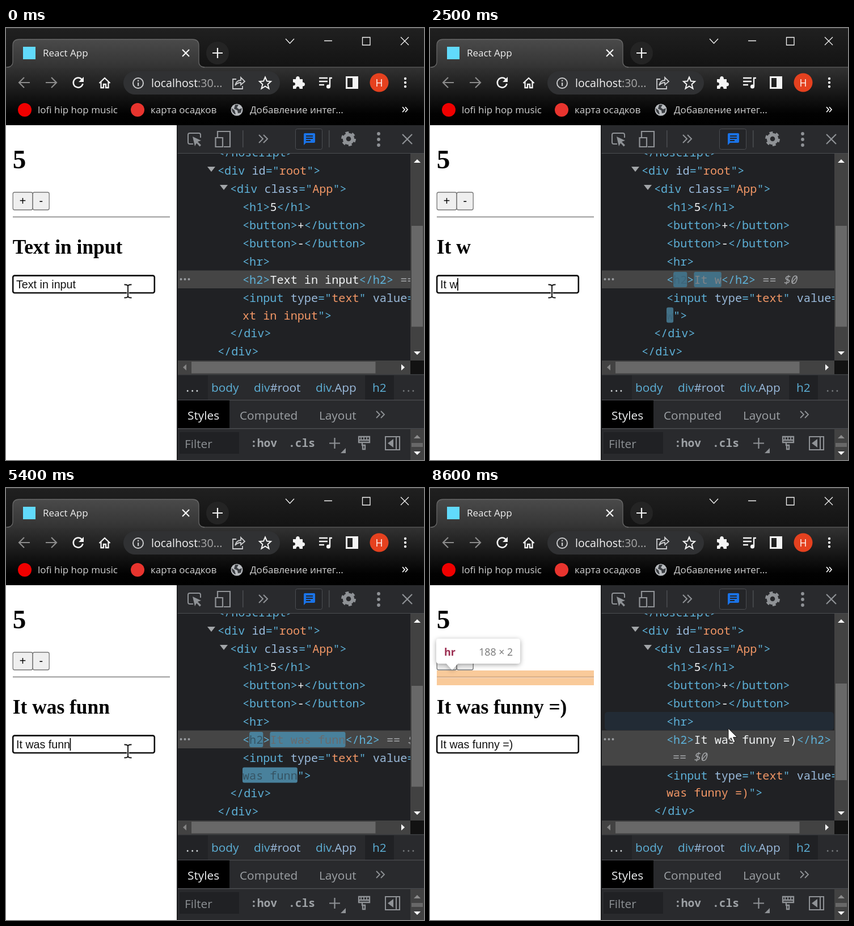
An HTML page for the animation above (8.7 s loop, 737 by 760 pixels).

```html
<!DOCTYPE html>
<html lang="en">
<head>
<meta charset="utf-8">
<title>React App</title>
<style>
html, body { margin: 0; width: 100%; height: 100%; overflow: hidden; background: #fff; }
svg { display: block; width: 737px; height: 760px; }
text { white-space: pre; }
.ui { font-family: "Open Sans", "Noto Sans", sans-serif; }
.code { font: 20.17px "Noto Sans Mono", monospace; fill: #5db0d7; }
.serif { font-family: "Liberation Serif", serif; font-weight: bold; }
.arial { font: 19.67px "Liberation Sans", sans-serif; }
.line { fill: none; stroke-width: 2; }
.attr { fill: #9bbbdc; }
.val { fill: #f29766; }
.txt { fill: #f1f3f4; }
.dim { fill: #a3a5a8; }
</style>
</head>
<body>
<svg viewBox="0 0 737 760">
  <defs>
    <linearGradient id="strip" x2="0" y2="1"><stop stop-color="#202020"/><stop offset="1" stop-color="#131313"/></linearGradient>
    <linearGradient id="tab" x2="0" y2="1"><stop stop-color="#4a4a4a"/><stop offset="1" stop-color="#333"/></linearGradient>
    <linearGradient id="bar" x2="0" y2="1"><stop stop-color="#323232"/><stop offset=".8" stop-color="#020202"/><stop offset="1" stop-color="#000"/></linearGradient>
    <filter id="shadow" x="-20%" y="-30%" width="140%" height="170%"><feDropShadow dx="0" dy="2" stdDeviation="4" flood-opacity=".35"/></filter>
    <clipPath id="tree"><rect x="303" y="221" width="410" height="363"/></clipPath>
  </defs>
  <g id="page"></g>
  <g id="chrome"></g>
  <g id="tools"></g>
  <g id="dom" clip-path="url(#tree)"></g>
  <g id="scroll"></g>
  <g id="pointer"></g>
</svg>
<script>
const LOOP = 8700, CH = 12.1;
const $ = id => document.getElementById(id);
const esc = s => s.replace(/&/g, '&amp;').replace(/</g, '&lt;');
const rect = (x, y, w, h, fill, more = '') =>
  `<rect x="${x}" y="${y}" width="${w}" height="${h}" fill="${fill}" ${more}/>`;
const circle = (x, y, r, fill, more = '') => `<circle cx="${x}" cy="${y}" r="${r}" fill="${fill}" ${more}/>`;
const line = (d, color, w = 2, more = '') =>
  `<path class="line" d="${d}" stroke="${color}" style="stroke-width:${w}" ${more}/>`;
const shape = (d, fill, more = '') => `<path d="${d}" fill="${fill}" ${more}/>`;
const text = (x, y, s, cls, fill, size, more = '') =>
  `<text x="${x}" y="${y}" class="${cls}" fill="${fill}" font-size="${size}" ${more}>${esc(s)}</text>`;
const ui = (x, y, s, fill, size = 20.8, more = '') => text(x, y, s, 'ui', fill, size, more);
const dots = (x, ys, r, fill) => ys.map(y => circle(x, y, r, fill)).join('');

// Code line: parts are [class or colour, string, extra attributes].
const code = (x, y, parts) => `<text class="code" x="${x}" y="${y}">` + parts.map(([c, s, more = '']) =>
  `<tspan ${c[0] === 'r' ? `style="fill:${c}"` : `class="${c}"`} ${more}>${esc(s)}</tspan>`).join('') + '</text>';

function drawChrome() {
  const white = '#f4f4f4', grey = '#c9cacc';
  $('chrome').innerHTML =
    rect(0, 0, 737, 70, 'url(#strip)') + rect(0, 0, 737, 1, '#3a3a3a') +
    rect(0, 69, 737, 102, 'url(#bar)') + line('M0 69H737', '#555', 1.5) +
    shape('M4 70Q12 69 12 60V31Q12 20 23 20H329Q340 20 340 31V60Q340 69 348 70Z', 'url(#tab)') +
    line('M2 69Q12 68 12 60V31Q12 20 23 20H329Q340 20 340 31V60Q340 68 350 69', '#686868', 1.3) +
    rect(30, 33, 22, 22, '#61dafb') +
    ui(65, 50, 'React App', '#f0f0f0', 17) +
    line('M311 38L323 50M323 38L311 50', white, 2.2) +
    circle(373, 44, 20, '#242424') + line('M364 44H382M373 35V53', white, 2.2) +
    line('M493 19L500.500 27L508 19M561 22.500H575M628.500 16.500H642V30H628.500ZM696 16L710 30M710 16L696 30', white, 1.3) +
    line('M42 96H24M32 87L23 96L32 105', '#8b8b8b', 2.2) +
    line('M70 96H88M80 87L89 96L80 105', '#8b8b8b', 2.2) +
    line('M134 91A8.500 8.500 0 1 0 135.500 98', white, 2.5) + shape('M137 86V95H128Z', white) +
    line('M164.500 97L174 88L183.500 97M167.500 95V105H172V99H176V105H180.500V95', white, 2.3) +
    rect(207, 76, 276, 41, '#303133', 'rx="20.5"') +
    circle(233, 97, 9, 'none', `stroke="${grey}" stroke-width="2"`) +
    rect(232, 96, 2.2, 6, grey) + rect(232, 91.5, 2.2, 2.4, grey) +
    `<text class="ui" x="256" y="104" font-size="19.6" fill="${white}">localhost<tspan fill="#a8a8a8">:30...</tspan></text>` +
    line('M406 90H400V107H417V102M404 101Q406 92 414 92V87L421 94L414 100V96Q408 96 404 101Z', grey, 1.8) +
    line('M457 86.500L460 93.500L467 94L461.500 99L463.500 106.500L457 102.500L450.500 106.500L452.500 99L447 94L454 93.500Z', white, 2) +
    shape('M506 90H511Q511 85 514.500 85T518 90H523V95.500Q527 95.500 527 99T523 102.500V107H517.500Q517.500 103 514.500 103T511.500 107H506V101.500Q510 101.500 510 98.500T506 95.500Z', white) +
    line('M552 88H567M552 94H567M552 100H561M571 103V88H575', white, 2.4) + circle(568.5, 103, 3.6, white) +
    rect(600.5, 86.5, 19, 19, 'none', `stroke="${white}" stroke-width="3"`) + rect(611, 87, 8, 18, white) +
    circle(658, 96, 16.5, '#e5411f') + ui(658, 102.5, 'H', '#fff', 17.5, 'text-anchor="middle"') +
    dots(704, [89, 96, 103], 2.2, white) +
    circle(33, 144, 12, '#f00000') + ui(56, 150, 'lofi hip hop music', '#d2d2d2', 17) +
    circle(232, 144, 12, '#e8342e') + ui(255, 150, 'карта осадков', '#d2d2d2', 17) +
    circle(407, 144, 10.5, '#b9bcc0') +
    shape('M398 141L403 145L405 152Q398 150 398 141ZM404 135L410 135L407 140L411 143L416 141L414 149L409 150L408 145L402 142Z', '#3b3e42') +
    ui(430, 150, 'Добавление интег...', '#d2d2d2', 17) +
    line('M699 139L703 143.500L699 148M704 139L708 143.500L704 148', white, 1.8);
}

function drawTools() {
  const grey = '#8f9296', tab = '#9da1a5';
  const arrow = (x, y, dx, dy, fill) => shape(dx
    ? `M${x - 3 * dx} ${y - 5.5}V${y + 5.5}L${x + 3 * dx} ${y}Z`
    : `M${x - 6} ${y - 3 * dy}H${x + 6}L${x} ${y + 3 * dy}Z`, fill);
  $('tools').innerHTML =
    rect(301, 171, 436, 589, '#292a2d') + rect(301, 171, 1.5, 589, '#17181a') +
    rect(302.5, 220, 435, 1, '#4b4d51') + rect(303, 221, 434, 364, '#202124') +
    line('M330 204H324Q321 204 321 201V188Q321 185 324 185H340Q343 185 343 188V193', grey, 2) +
    shape('M329 191L344 198L338 200L344 206L341.500 208.500L336 202.500L333 208Z', grey) +
    line('M373 193V182H395V209H384M369.500 193H382V209H369.500Z', grey, 2.2) +
    rect(417, 180, 1.5, 30, '#4b4d51') + rect(569, 180, 1.5, 30, '#4b4d51') +
    line('M446 188L453 195L446 202M454 188L461 195L454 202', grey, 2) +
    rect(510.5, 177.5, 47, 36, '#242528', 'rx="3" stroke="#4b4d51"') +
    shape('M527 185H543Q545 185 545 187V200Q545 202 543 202H529L525 206V187Q525 185 527 185Z', '#1a73e8') +
    line('M529 190H541M529 194H541M529 198H537', '#242528', 1.8) +
    circle(604, 195, 7.3, 'none', `stroke="${grey}" stroke-width="6"`) +
    circle(604, 195, 11, 'none', `stroke="${grey}" stroke-width="4" stroke-dasharray="5.76 5.76"`) +
    dots(657, [186, 196, 206], 2.9, grey) +
    line('M699 187L716 204M716 187L699 204', grey, 2.2) +
    rect(713, 221, 24, 364, '#424242') + arrow(725, 234, 0, -1, '#fff') + arrow(725, 572, 0, 1, '#fff') +
    rect(303, 585, 410, 24, '#424242') + rect(327, 587, 324.5, 20.5, '#686868') +
    arrow(315, 597, -1, 0, '#858585') + arrow(700, 597, 1, 0, '#fff') + rect(713, 585, 24, 24, '#121212') +
    rect(303, 609, 434, 1.5, '#3c3e41') + rect(303, 611, 53, 43, '#222326') + rect(633, 611, 51, 43, '#202124') +
    ui(317, 640, '...', '#c6cacd', 24, 'letter-spacing="2"') + ui(362, 640, 'body', '#5db0d7') +
    `<text class="ui" font-size="20.8" y="640" fill="#5db0d7"><tspan x="437">div</tspan><tspan class="attr">#root</tspan><tspan x="546">div</tspan><tspan class="attr">.App</tspan></text>` +
    ui(646, 640, 'h2', '#5db0d7') + ui(698, 640, '...', '#707376', 24, 'letter-spacing="2"') +
    rect(303, 654, 434, 1.2, '#4b4d51') + rect(303, 655, 91, 49, '#000') + rect(303, 704, 434, 1.5, '#4b4d51') +
    ui(320, 689, 'Styles', '#f1f3f4') + ui(412, 689, 'Computed', tab) + ui(552, 689, 'Layout', tab) +
    line('M653 674L659 680L653 686M661 674L667 680L661 686', grey, 1.8) +
    rect(306, 711, 105, 38, '#202124') + ui(315, 739, 'Filter', '#8c9094') +
    [[431, ':hov'], [498, '.cls']].map(([x, s]) =>
      text(x, 737, s, '', tab, 19.6, 'font-family="Noto Sans Mono, monospace" font-weight="600"')).join('') +
    line('M570 730.500H589M579.500 721V740', grey, 2.2) + shape('M599 739V748H590Z', grey) +
    line('M622 719H641V729H622ZM622 725H641M628 730V734H633V741H629V734', grey, 2.3) + line('M626 719V724M631 719V724M636 719V724', grey, 1.8) +
    rect(669, 719, 25, 23, 'none', `stroke="${grey}" stroke-width="2"`) + rect(687, 720, 2, 21, grey) + shape('M683 723V738L673 730.500Z', grey) +
    rect(713, 706, 24, 54, '#424242') + rect(715, 730, 20, 7, '#686868') +
    arrow(725, 719, 0, -1, '#8c8c8c') + arrow(725, 748, 0, 1, '#fff');
}

const START = 'Text in input', PHRASE = 'It was funny =)';
const KEYS = [1300, 1590, 2000, 2300, 2600, 2850, 3070, 3700, 4300, 4800, 5270, 5700, 6100, 6490, 6750];
const SELECT_AT = 800;

const WHITE = [241, 243, 244], BLUE = [93, 176, 215], ORANGE = [242, 151, 102], DARK = [34, 37, 41];
const mix = (a, b, k) => `rgb(${a.map((v, i) => Math.round(v + (b[i] - v) * k))})`;
const clamp = v => Math.min(1, Math.max(0, v));
const smooth = v => { v = clamp(v); return v * v * (3 - 2 * v); };

// cubic-bezier(0, 0, .2, 1)
function easeOut(x) {
  let lo = 0, hi = 1;
  for (let i = 0; i < 20; i++) {
    const s = (lo + hi) / 2;
    if (.6 * s * s + .4 * s * s * s < x) lo = s; else hi = s;
  }
  return lo * lo * (3 - 2 * lo);
}

// Update flash: fades to dark for 80% of 1400 ms, then clears.
function flash(age) {
  const p = age / 1400;
  if (p >= 1) return null;
  const k = easeOut(clamp(p / .8)), out = p > .8 ? easeOut((p - .8) / .2) : 0;
  return {
    bg: mix(BLUE, DARK, k), alpha: 1 - out,
    ink: (mid, end) => out ? mix(mid, end, out) : mix(DARK, mid, k)
  };
}

function pointerAt(t) {
  const a = smooth((t - 6950) / 650), b = smooth((t - 7900) / 600);
  return { x: 215 + 172 * a + 139 * b, y: 462 + 10 * a - 49 * b };
}

function drawPage(t, value, lastKey, hover) {
  const selected = t >= SELECT_AT && t < KEYS[0];
  const button = (x, w, s) => rect(x, 289, w, 31, '#efefef', 'rx="3" stroke="#767676" stroke-width="1.3"') +
    text(x + w / 2, 311, s, 'arial', '#000', 19.67, 'text-anchor="middle"');
  let out = rect(0, 171, 302, 589, '#fff') +
    text(11.8, 247, '5', 'serif', '#000', 47.2) + button(12.2, 34.8, '+') + button(47.2, 29, '-') +
    rect(12, 331.5, 277, 1.5, '#8e8e8e') + rect(12, 333, 277, 1.3, '#e4e4e4') +
    text(11.8, 397, value, 'serif', '#000', 35.4) +
    rect(12.2, 435.6, 249.6, 30.4, '#fff', 'rx="3" stroke="#101010" stroke-width="2.6"') +
    '<rect id="mark" x="18" y="440" height="22" width="0"/>' +
    text(18, 458, value, 'arial', selected ? '#fff' : '#111', 19.67, 'id="field"');
  if (hover) {
    const isH2 = hover === 'h2', y = isH2 ? 280 : 265;
    const orange = 'rgba(246,178,107,.68)';
    out += isH2
      ? rect(12, 336, 277, 29, orange) + rect(12, 365, 277, 41, 'rgba(111,168,220,.66)') + rect(12, 406, 277, 29.5, orange)
      : rect(12, 321, 277, 11, orange) + rect(12, 332, 277, 3, 'rgba(246,190,140,.66)') + rect(12, 335, 277, 12, orange);
    out += '<g filter="url(#shadow)">' +
      shape(`M16 ${y}H154Q159 ${y} 159 ${y + 5}V${y + 39}Q159 ${y + 44} 154 ${y + 44}H49L39 ${y + 55}L29 ${y + 44}H16Q11 ${y + 44} 11 ${y + 39}V${y + 5}Q11 ${y} 16 ${y}Z`, '#fff') + '</g>' +
      ui(25, y + 30, hover, '#9c2f52', 18, 'font-weight="bold"') +
      ui(146, y + 30, isH2 ? '188 × 28' : '188 × 2', '#777', 17.7, 'text-anchor="end"');
  }
  $('page').innerHTML = out;
  const width = value ? $('field').getComputedTextLength() : 0, mark = $('mark');
  const lit = Math.floor((t - lastKey) / 530) % 2 === 0;
  if (selected) {
    mark.setAttribute('width', width);
    mark.setAttribute('fill', '#3367d1');
  } else if (lit) {
    mark.setAttribute('x', 18 + width - .5);
    mark.setAttribute('width', 1.7);
  }
}

function drawDom(value, f, hover) {
  const wrap = value.length > 13, col = n => 417 + n * CH;
  const y2 = wrap ? [512.5, 542.5, 574.5, 606] : [481.5, 512.5, 543.5, 575.5];
  const tail = value === START ? value.slice(2) : value.length < 3 ? value.slice(-1) : value.slice(3);
  const glow = (x, y, n) => f && n ? rect(x, y, n * CH, 27, f.bg, `rx="3" opacity="${f.alpha}"`) : '';
  const ink = (cls, mid, end) => f ? f.ink(mid, end) : cls;
  const fold = (x, y) => shape(`M${x} ${y}H${x + 14}L${x + 7} ${y + 9}Z`, '#a2a5a8');
  const button = (y, s) => code(417, y, [['', '<button>'], ['txt', s], ['', '</button>']]);
  const ref = [['dim', '== '], ['dim', '$0', 'font-style="italic"']];
  const afterH2 = wrap ? [] : [['', ' '], ...ref];
  $('dom').innerHTML =
    (hover === 'hr' ? rect(308, 394, 404, 32, '#222b35', 'rx="5"') : '') +
    rect(303, 426.5, 410, wrap ? 62 : 31.5, '#454545') +
    dots(308.5, [442], 2, '#9a9da0') + dots(315.5, [442], 2, '#9a9da0') + dots(322.5, [442], 2, '#9a9da0') +
    code(373, 226, [['', '</noscript>']]) +
    fold(355, 244) + code(373, 258, [['', '<div '], ['attr', 'id'], ['', '="'], ['val', 'root'], ['', '">']]) +
    fold(377, 276) + code(395, 290, [['', '<div '], ['attr', 'class'], ['', '="'], ['val', 'App'], ['', '">']]) +
    code(417, 322, [['', '<h1>'], ['txt', '5'], ['', '</h1>']]) +
    button(354, '+') + button(386, '-') + code(417, 418, [['', '<hr>']]) +
    glow(col(1), 429, 2) + glow(col(4), 429, value.length) +
    code(417, 450, [['', '<'], [ink('', BLUE, BLUE), 'h2'], ['', '>'],
      [ink('txt', WHITE, WHITE), value], ['', '</h2>'], ...afterH2]) +
    (wrap ? code(428, 479.5, ref) : '') +
    code(417, y2[0], [['', '<input '], ['attr', 'type'], ['', '="'], ['val', 'text'], ['', '" '], ['attr', 'value'], ['', '="']]) +
    glow(417, y2[1] - 21, tail.length) +
    code(417, y2[1], [[ink('val', BLUE, ORANGE), tail], ['', '">']]) +
    code(395, y2[2], [['', '</div>']]) + code(373, y2[3], [['', '</div>']]);
  $('scroll').innerHTML = wrap ? rect(715, 344, 20, 170, '#686868') : rect(715, 348, 20, 177.5, '#686868');
}

function drawPointer({ x, y }) {
  const inField = x < 263 && y > 434 && y < 467;
  const beam = 'M208.500 451.500Q214 451 215 454Q216 451 221.500 451.500M215 453V472M208.500 474.500Q214 475 215 472Q216 475 221.500 474.500';
  $('pointer').innerHTML = inField
    ? `<g transform="translate(${x - 215} ${y - 462})">${line(beam, '#fff', 3.5)}${line(beam, '#111', 1.9)}</g>`
    : `<g transform="translate(${x} ${y})">${shape('M0 0V21L5 16.500L8.500 25L12 23.500L8.500 15.500H15.500Z', '#fff', 'stroke="#222" stroke-width="1"')}</g>`;
}

function draw(t) {
  const typed = KEYS.filter(k => k <= t).length;
  const value = typed ? PHRASE.slice(0, typed) : START;
  const lastKey = typed ? KEYS[typed - 1] : -600;
  const p = pointerAt(t);
  const hover = p.x < 303 ? '' : p.y < 426 ? 'hr' : 'h2';
  drawPage(t, value, lastKey, hover);
  drawDom(value, typed ? flash(t - lastKey) : null, hover);
  drawPointer(p);
}

drawChrome();
drawTools();
const begin = performance.now();
function tick() {
  const t = (performance.now() - begin) % LOOP;
  draw(Math.floor(t / 100) * 100);
  requestAnimationFrame(tick);
}
tick();
</script>
</body>
</html>
```
